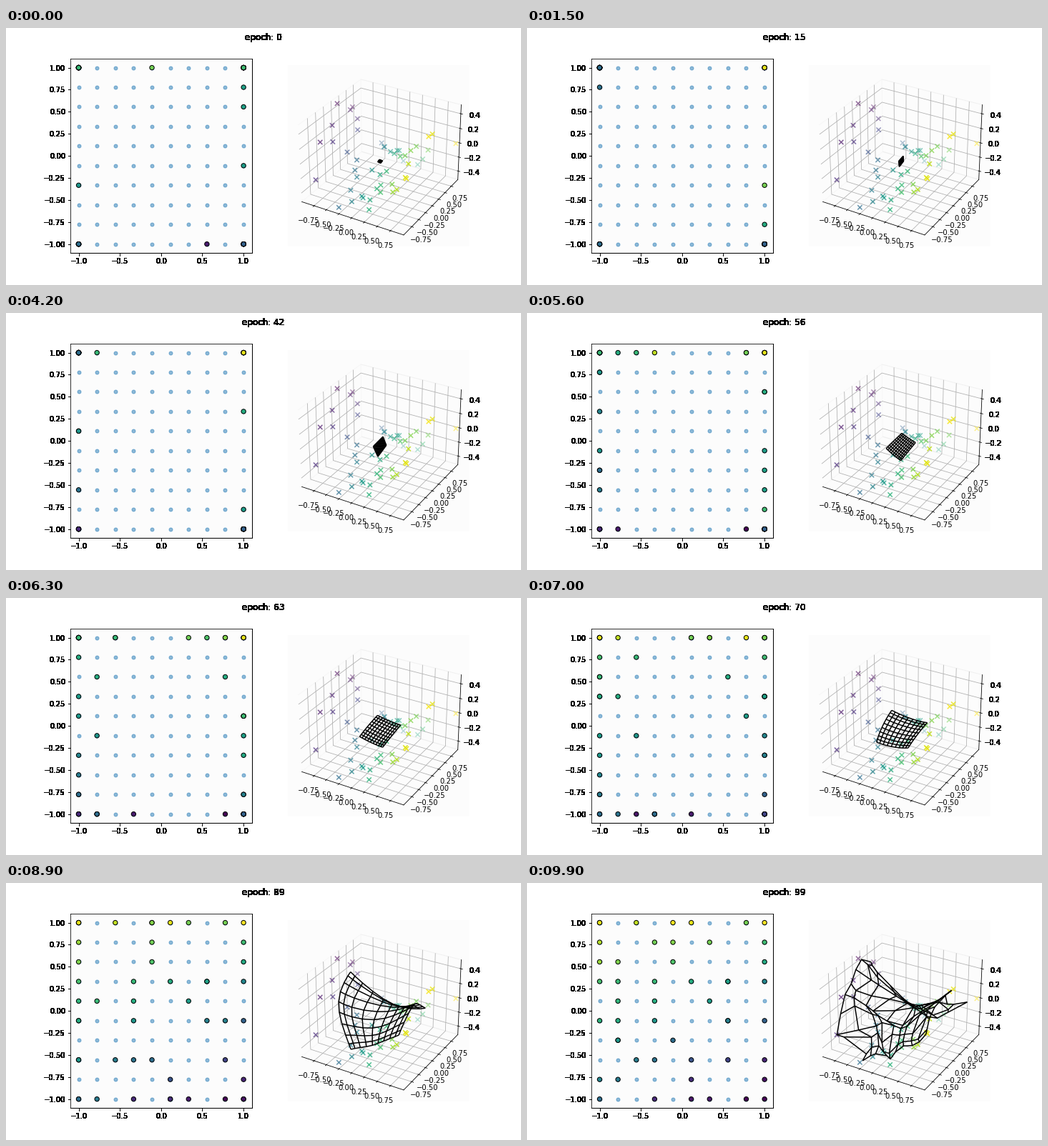
A matplotlib script that plays this animation: 720 by 360 pixels, repeating every 10 s.

```python
import numpy as np
import matplotlib.pyplot as plt
from matplotlib.animation import FuncAnimation

EPOCHS, SIDE, SAMPLES = 100, 10, 50
SIGMA_MAX, SIGMA_MIN = 3.0, 0.1
PAPER = "#fcfcfc"


def make_saddle():
    np.random.seed(0)
    x, y = np.random.uniform(-1, 1, (2, SAMPLES))
    return np.column_stack([x, y, (x**2 - y**2) / 2])


def train(data, nodes):
    """Batch self-organizing map with a shrinking neighbourhood."""
    latent = data[:, [1, 0]]
    history = []
    for epoch in range(EPOCHS):
        sigma = SIGMA_MIN + (SIGMA_MAX - SIGMA_MIN) * (1 - epoch / EPOCHS)
        gap = ((nodes[:, None] - latent) ** 2).sum(2)
        weight = np.exp(-gap / (2 * sigma**2))
        mesh = weight @ data / weight.sum(1, keepdims=True)
        best = ((data[:, None] - mesh) ** 2).sum(2).argmin(1)
        latent = nodes[best]
        history.append((latent, mesh.reshape(SIDE, SIDE, 3)))
    return history


def harden(img, dpi):
    """Turn every touched pixel fully opaque."""
    img[..., 3] = img[..., 3] > 0
    return img, 0, 0


def strands(mesh):
    return [*mesh, *mesh.transpose(1, 0, 2)]


def padded(values, margin):
    low, high = values.min(), values.max()
    pad = margin * (high - low)
    return low - pad, high + pad


data = make_saddle()
x, y, z = data.T
axis = np.linspace(-1, 1, SIDE)
nodes = np.stack(np.meshgrid(axis, axis), -1).reshape(-1, 2)
history = train(data, nodes)

fig = plt.figure(figsize=(10, 5), dpi=72, facecolor="white")
fig.subplots_adjust(left=0.125, right=0.9, bottom=0.125, top=0.88, wspace=0.2)
title = fig.suptitle("epoch: 0", fontsize=12)

flat = fig.add_subplot(121, facecolor=PAPER)
flat.scatter(*nodes.T, s=25, alpha=0.5, color="tab:blue")
winners = flat.scatter(*history[0][0].T, c=x, s=40, edgecolors="k", zorder=3)
flat.set(xlim=(-1.1, 1.1), ylim=(-1.1, 1.1))

space = fig.add_subplot(122, projection="3d", computed_zorder=False,
                        facecolor=PAPER)
space.view_init(30, -60)
space.scatter(x, y, z, c=x, marker="x", s=40, zorder=2)
wire = space.plot_wireframe(*history[0][1].transpose(2, 0, 1), color="k",
                            linewidth=1.5, rstride=1, cstride=1, zorder=3)
quarters = np.arange(-0.75, 0.8, 0.25)
space.set(xlim=padded(x, 1 / 48), ylim=padded(y, 1 / 48), zlim=padded(z, 0.073),
          xticks=quarters, yticks=quarters, zticks=np.linspace(-0.4, 0.4, 5))
for part in (space.xaxis, space.yaxis, space.zaxis):
    part.pane.set_facecolor("none")

heights = [tick.label1 for tick in space.zaxis.get_major_ticks()]
edges = [flat.spines["right"], flat.spines["bottom"]]
for part in (title, flat.xaxis, flat.yaxis, *edges, *heights):
    part.set_agg_filter(harden)


def update(epoch):
    latent, mesh = history[epoch]
    title.set_text(f"epoch: {epoch}")
    winners.set_offsets(latent)
    wire.set_segments(strands(mesh))
    return title, winners, wire


anim = FuncAnimation(fig, update, frames=EPOCHS, interval=100, repeat=True,
                     repeat_delay=0, init_func=lambda: update(0))
plt.show()
```
